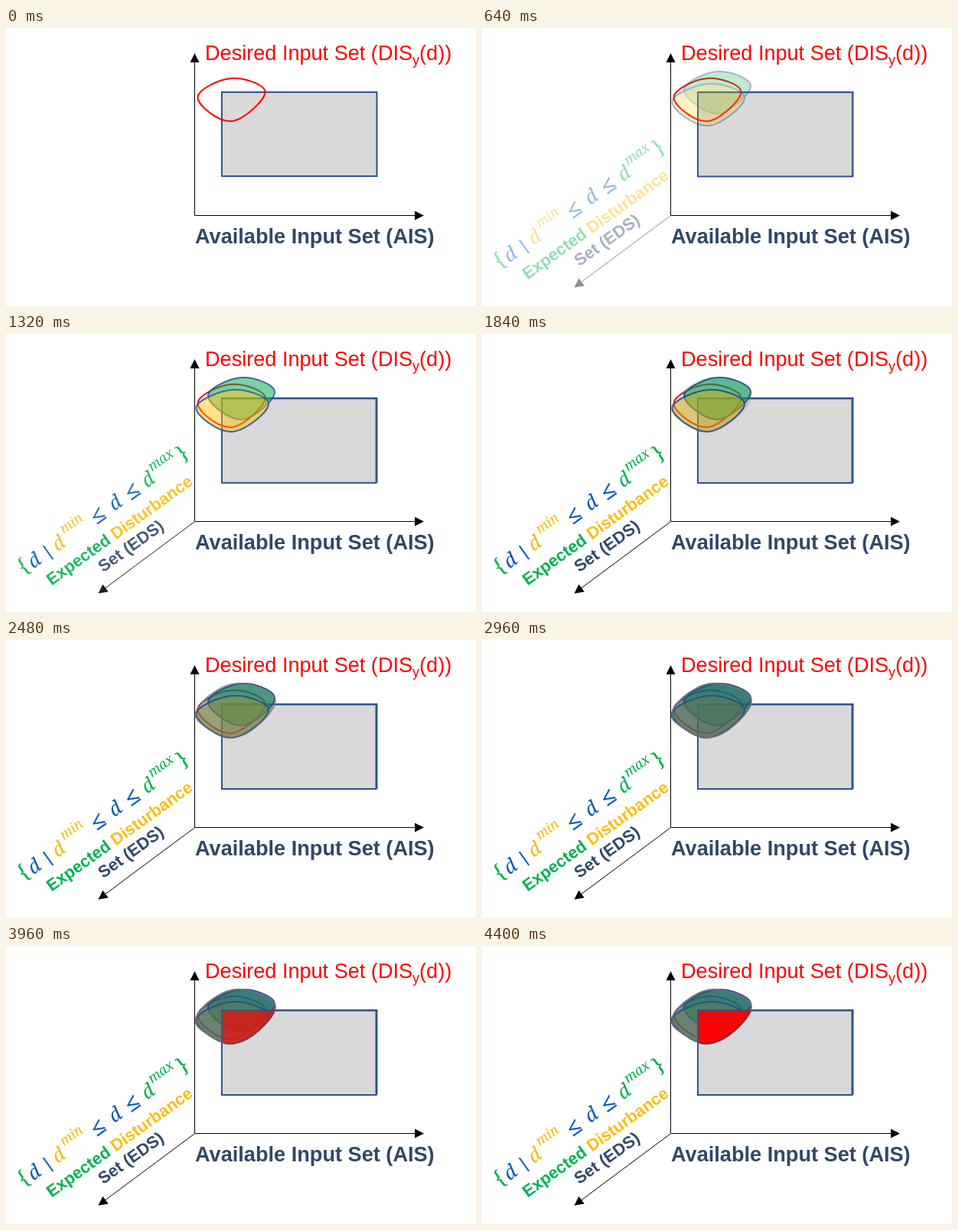
Write an HTML page that moves like this. It is 614 by 364 pixels and loops after 4440 ms.

```html
<!DOCTYPE html>
<html lang="en">
<head>
<meta charset="utf-8">
<title>Input sets</title>
<style>
  html, body { margin: 0; width: 100%; height: 100%; overflow: hidden; background: #fff; }
  svg { display: block; width: 614px; height: 364px; }
  text { font-family: "Liberation Sans", Arial, sans-serif; white-space: pre; }
  .bold { font-weight: bold; }
  .math text { font-family: "Noto Serif", "Liberation Serif", serif; font-style: italic; text-anchor: middle; }
  .math .up { font-style: normal; }
  .math .heavy { font-style: normal; stroke: currentColor; stroke-width: .7; }
  .line { fill: none; stroke: #2f528f; stroke-width: 2; }
  .box { fill: #d9d9d9; stroke: #2f528f; stroke-width: 2; }
  .axis { stroke: #000; stroke-width: 1; }
</style>
</head>
<body>
<svg viewBox="0 0 614 364" xmlns="http://www.w3.org/2000/svg">
  <defs>
    <clipPath id="inside"><rect x="282" y="84" width="202" height="111"/></clipPath>
  </defs>

  <rect class="box" x="282" y="84" width="202.5" height="110"/>
  <rect class="box spread" x="282" y="84.5" width="201.5" height="110.5"/>
  <path class="axis" d="M246.5 245.5V42M246.5 245.5H537"/>
  <path d="M246.5 33l6 12h-12zM546 245.5l-12 6v-12z"/>
  <text x="260" y="42" font-size="27.1" fill="#f00">Desired Input Set (DIS<tspan font-size="18" dy="6">y</tspan><tspan dy="-6">(d))</tspan></text>
  <text class="bold" x="247" y="282" font-size="27.15" fill="#2f4868">Available Input Set (AIS)</text>
  <path id="wanted" fill="none" stroke="#f00" stroke-width="2"/>

  <g class="spread">
    <path class="axis" d="M246 246L128 334"/>
    <path d="M0 0l12-6v12z" transform="translate(120.5 339.8) rotate(-36.7)"/>
    <path id="high" fill="#00b050" fill-opacity=".6" stroke="#2f528f" stroke-width="2"/>
    <path id="low" fill="#ffc000" fill-opacity=".52" stroke="#2f528f" stroke-width="2"/>
    <g class="bold" font-size="21.8">
      <text transform="translate(59.5 329.8) rotate(-35.7)" fill="#00b050">Expected <tspan fill="#f9bd12">Disturbance</tspan></text>
      <text transform="translate(127 312.5) rotate(-35.7)" fill="#2f4868">Set (EDS)</text>
    </g>
    <g id="math" class="math" transform="translate(41.8 303.5) rotate(-35.5)"></g>
  </g>

  <path id="hull" class="hull" fill="#215570" fill-opacity=".67" stroke="#66707c" stroke-width="2.2"/>

  <g class="overlap">
    <g clip-path="url(#inside)"><path id="core" fill="#f00" stroke="#6b3444" stroke-width="1.5"/></g>
    <path class="line" d="M282 124V84H346"/>
  </g>
</svg>
<script>
  const LOOP = 4440, STEP = 40, PHASE = LOOP / 3;
  const get = id => document.getElementById(id);

  // Closed smooth curve through the given points.
  function blob(points) {
    const n = points.length;
    const at = i => points[(i + n) % n];
    const handle = (i, sign) => at(i).map((v, k) => v + sign * (at(i + 1)[k] - at(i - 1)[k]) / 5.4);
    let d = "M" + at(0);
    for (let i = 0; i < n; i++) d += "C" + [handle(i, 1), handle(i + 1, -1), at(i + 1)].join(" ");
    return d + "Z";
  }

  const hull = blob([[248, 96], [271, 69], [308, 57], [351, 76], [331, 110], [295, 128], [263, 115]]);
  const curves = {
    wanted: blob([[250.5, 91], [294, 66], [338.5, 84], [294, 122]]),
    high: blob([[264, 81], [308, 57], [351, 76], [308, 112]]),
    low: blob([[248.5, 97], [297, 73], [343, 92], [295, 128]]),
    hull, core: hull
  };
  for (const id in curves) get(id).setAttribute("d", curves[id]);

  const GREEN = "#00b050", BLUE = "#0058b4", GOLD = "#f5b911";
  // text, centre along the line, baseline shift, size, colour, style
  const tokens = [
    ["{", -16, -1, 28, GREEN, "up"],
    ["d", 0, 0, 25.5, BLUE],
    ["|", 21, -1, 21, BLUE, "heavy"],
    ["d", 39, 0, 25.5, GOLD],
    ["min", 67.5, -14, 18, GOLD],
    ["≤", 102, 1, 30, BLUE, "heavy"],
    ["d", 130, 0, 25.5, BLUE],
    ["≤", 157, 1, 30, BLUE, "heavy"],
    ["d", 182.5, 0, 25.5, GREEN],
    ["max", 211, -14, 18, GREEN],
    ["}", 239, -1, 28, GREEN, "up"]
  ];
  for (const [label, x, y, size, fill, kind = ""] of tokens) {
    const el = document.createElementNS("http://www.w3.org/2000/svg", "text");
    const attrs = { x, y, "font-size": size, fill, color: fill, class: kind };
    for (const name in attrs) el.setAttribute(name, attrs[name]);
    el.textContent = label;
    get("math").append(el);
  }

  const layers = [".spread", ".hull", ".overlap"].map(s => document.querySelectorAll(s));

  function draw(now) {
    const t = Math.floor((now % LOOP) / STEP) * STEP;
    layers.forEach((group, i) => {
      const alpha = Math.min(1, Math.max(0, t / PHASE - i));
      group.forEach(el => el.setAttribute("opacity", alpha.toFixed(4)));
    });
  }

  const start = performance.now();
  function tick() {
    draw(performance.now() - start);
    requestAnimationFrame(tick);
  }
  tick();
</script>
</body>
</html>
```
